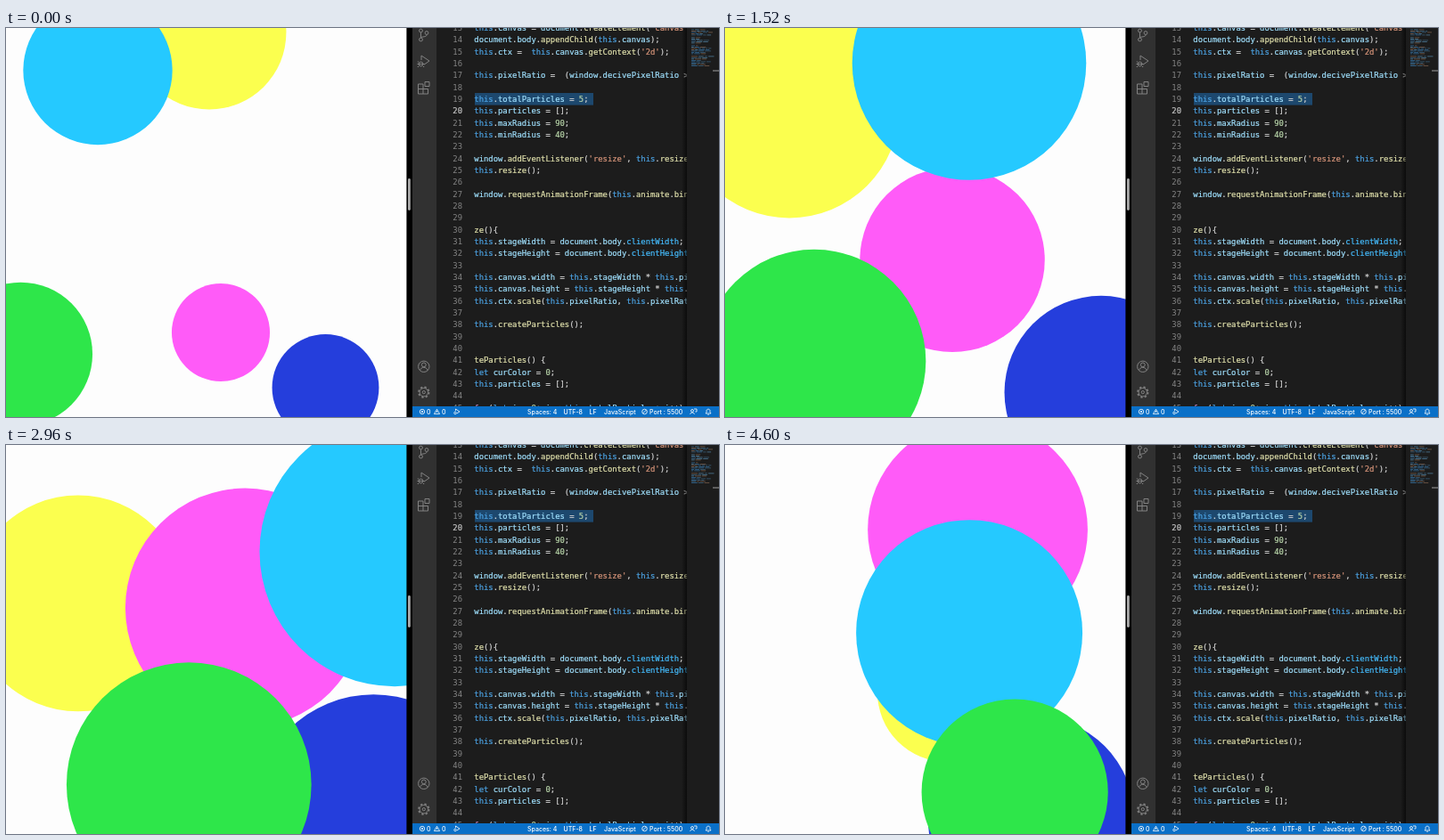
Write an HTML page that moves like this. It is 800x437 px and loops after 4.64 s.

```html
<!DOCTYPE html>
<html lang="en">
<head>
<meta charset="utf-8">
<title>Bouncing particles beside an editor</title>
<style>
  html, body { margin: 0; height: 100%; overflow: hidden; background: #fdfdfd; }
  svg { display: block; width: 800px; height: 437px; }
  text { white-space: pre; }
  .code { font: 8.887px "DejaVu Sans Mono", monospace; fill: #d4d4d4; stroke: #d4d4d4; stroke-width: .2; }
  .num { fill: #858585; stroke: none; text-anchor: end; }
  .status { font: 500 7px Inter, sans-serif; fill: #fff; }
  .line { fill: none; stroke: #828282; }
  .mini { fill: none; stroke: #fff; stroke-width: .8; }
</style>
</head>
<body>
<svg viewBox="0 0 800 437">
  <defs>
    <clipPath id="codeArea"><path d="M483 0H764V425H483z"/></clipPath>
    <linearGradient id="shade">
      <stop offset="0" stop-color="#000" stop-opacity="0"/>
      <stop offset="1" stop-color="#000" stop-opacity=".6"/>
    </linearGradient>
  </defs>
  <rect width="450" height="437" fill="#fdfdfd"/>
  <g id="particles"></g>

  <rect x="449.4" width="6.6" height="437"/>
  <rect x="451" y="169" width="2.8" height="36" rx="1.4" fill="#adadad"/>
  <rect x="456" width="27" height="437" fill="#313131"/>
  <rect x="483" width="317" height="437" fill="#1c1c1c"/>
  <rect x="526" y="73" width="133" height="13.6" fill="#1d486e"/>
  <g id="code" class="code" clip-path="url(#codeArea)"></g>
  <rect x="758" width="6" height="425" fill="url(#shade)"/>
  <g id="minimap" opacity=".6"></g>
  <path d="M793 48H800" stroke="#a0a0a0"/>

  <g class="line">
    <circle cx="465.5" cy="3" r="1.9"/><circle cx="465.5" cy="13" r="1.9"/><circle cx="472" cy="5.5" r="1.9"/>
    <path d="M465.5 5V11M472 7.5C472 10 469 9.6 465.6 10.4"/>
    <path d="M466 36V31L475 37L469 41.2"/>
    <circle cx="465.5" cy="40.5" r="2.4"/><path d="M461.8 38H463M461.5 40.5H469.5M461.8 43.5H463M468 43.5H469.2"/>
    <path d="M462.5 63H468V74H462.5zM462.5 68.5H473.5V74H468M470 60.5H475V65.5H470z"/>
    <circle cx="468.8" cy="380.3" r="6.2"/><circle cx="468.8" cy="378.4" r="2.4"/>
    <path d="M464.6 384.6C465.5 380.2 472 380.2 473 384.6"/>
    <circle cx="468.8" cy="409.2" r="4.7"/><circle cx="468.8" cy="409.2" r="1.6"/>
    <circle cx="468.8" cy="409.2" r="5.8" stroke-width="1.7" stroke-dasharray="2.3 2.255"/>
  </g>

  <rect x="456" y="425" width="344" height="12" fill="#0a70c8"/>
  <g id="status" class="status"></g>
  <g class="mini">
    <circle cx="467" cy="431" r="2.7"/><path d="M465.9 429.9L468.1 432.1M468.1 429.9L465.9 432.1"/>
    <path d="M483.5 428.2L486.6 433.6H480.4zM483.5 430V432"/>
    <path d="M504.5 430V428L509 431L505.8 433"/><circle cx="504" cy="432.5" r="1.3"/>
    <circle cx="716.5" cy="431" r="2.8"/><path d="M714.6 433L718.4 429"/>
    <circle cx="770" cy="430" r="1.5"/><path d="M767.6 434C768 431.4 772 431.4 772.4 434M772 428H775V431H773.4"/>
    <path d="M785 433H791L790 431.6V430C790 427.6 786 427.6 786 430V431.6zM787.2 434.3H788.8"/>
  </g>
</svg>
<script>
const $ = id => document.getElementById(id);
const span = (color, text) => `<tspan fill="${color}" stroke="${color}">${text}</tspan>`;

const FIRST_LINE = 13;
const source = `this.canvas = document.createElement('canvas');
document.body.appendChild(this.canvas);
this.ctx =  this.canvas.getContext('2d');

this.pixelRatio =  (window.decivePixelRatio > 1) ? 2 : 1;

this.totalParticles = 5;
this.particles = [];
this.maxRadius = 90;
this.minRadius = 40;

window.addEventListener('resize', this.resize.bind(this), false);
this.resize();

window.requestAnimationFrame(this.animate.bind(this));


ze(){
this.stageWidth = document.body.clientWidth;
this.stageHeight = document.body.clientHeight;

this.canvas.width = this.stageWidth * this.pixelRatio;
this.canvas.height = this.stageHeight * this.pixelRatio;
this.ctx.scale(this.pixelRatio, this.pixelRatio);

this.createParticles();


teParticles() {
let curColor = 0;
this.particles = [];

for(let i = 0; i < this.totalParticles; i++) {`.split('\n');

const rules = [
  [/^'/, '#d8957a'],
  [/^(this|let)$/, '#4ca3e4'],
  [/^for$/, '#c586c0'],
  [/^client/, '#45bdff'],
  [/\($|^(resize|animate)$/, '#e2e2ad'],
  [/^\d/, '#b9d6aa'],
  [/./, '#a0e1ff'],
];

function highlight(line) {
  return line.replace(/'[^']*'|\w+|</g, (word, at) => {
    if (word === '<') return '&lt;';
    const isCall = line[at + word.length] === '(' && word !== 'for';
    const key = isCall ? word + '(' : word;
    return span(rules.find(([pattern]) => pattern.test(key))[1], word);
  });
}

$('code').innerHTML = source.map((line, i) => {
  const y = 2.9 + i * 13.34, n = FIRST_LINE + i;
  return `<text class="num" x="512" y="${y}">${n === 20 ? span('#c6c6c6', n) : n}</text>` +
    `<text x="525.3" y="${y}">${highlight(line)}</text>`;
}).join('');

$('status').innerHTML = [
  [472, '0'], [489, '0'], [585, 'Spaces: 4'], [625.5, 'UTF-8'],
  [654.5, 'LF'], [671, 'JavaScript'], [722, 'Port : 5500'],
].map(([x, label]) => `<text x="${x}" y="433.5">${label}</text>`).join('');

let seed = 7;
const random = () => (seed = seed * 16807 % 2147483647) / 2147483647;
const inks = ['#3f96dc', '#6cb8e8', '#4a86b0', '#b08468'];
let rows = '';
for (let y = 0; y < 51; y += 1.5) {
  if (random() < .22) continue;
  const indent = y > 46 ? 766 : 769;
  for (let x = indent, end = indent + 6 + random() * 16; x < end;) {
    const w = 2 + random() * 5;
    rows += `<rect x="${x}" y="${y}" width="${w}" height=".8" fill="${inks[random() * 4 | 0]}"/>`;
    x += w + 1;
  }
}
$('minimap').innerHTML = rows;

// Positions and speeds in px and px/s; peak is the largest radius, reached at peakTime.
const particles = [
  { color: '#fbff4f', x: 228, vx: -102.5, y: 5.1, vy: -61, peak: 127.6, peakTime: 2.17 },
  { color: '#ff5bf8', x: 241, vx: 9.25, y: 342, vy: -53.7, peak: 136.7, peakTime: 3.43 },
  { color: '#253edc', x: 358.5, vx: 41.8, y: 404, vy: 3.5, peak: 134.7, peakTime: 3.2 },
  { color: '#25c9ff', x: 103, vx: 112.5, y: 47.5, vy: -55.7, peak: 151.5, peakTime: 2.98 },
  { color: '#2ee64a', x: 16.5, vx: -73.1, y: 366.2, vy: 5.2, peak: 138.2, peakTime: 2.67 },
];
for (const p of particles) {
  p.node = document.createElementNS('http://www.w3.org/2000/svg', 'circle');
  p.node.setAttribute('fill', p.color);
  $('particles').append(p.node);
}

const LOOP = 4640, STEP = 40;
const LEFT = 0, TOP = -1.5, FAR = 450, KICK = 5.4; // a wall hit also pushes the particle inward

function bounce(position, near) {
  if (position < near) return 2 * near - position + KICK;
  if (position > FAR) return 2 * FAR - position - KICK;
  return position;
}

function draw(now) {
  const t = Math.floor(now % LOOP / STEP) * STEP / 1000;
  for (const p of particles) {
    p.node.setAttribute('cx', bounce(p.x + p.vx * t, LEFT));
    p.node.setAttribute('cy', bounce(p.y + p.vy * t, TOP));
    p.node.setAttribute('r', p.peak - 54.5 * (1 - Math.cos(.61 * (t - p.peakTime))));
  }
}

const start = performance.now();
function frame() {
  draw(performance.now() - start);
  requestAnimationFrame(frame);
}
frame();
</script>
</body>
</html>
```
